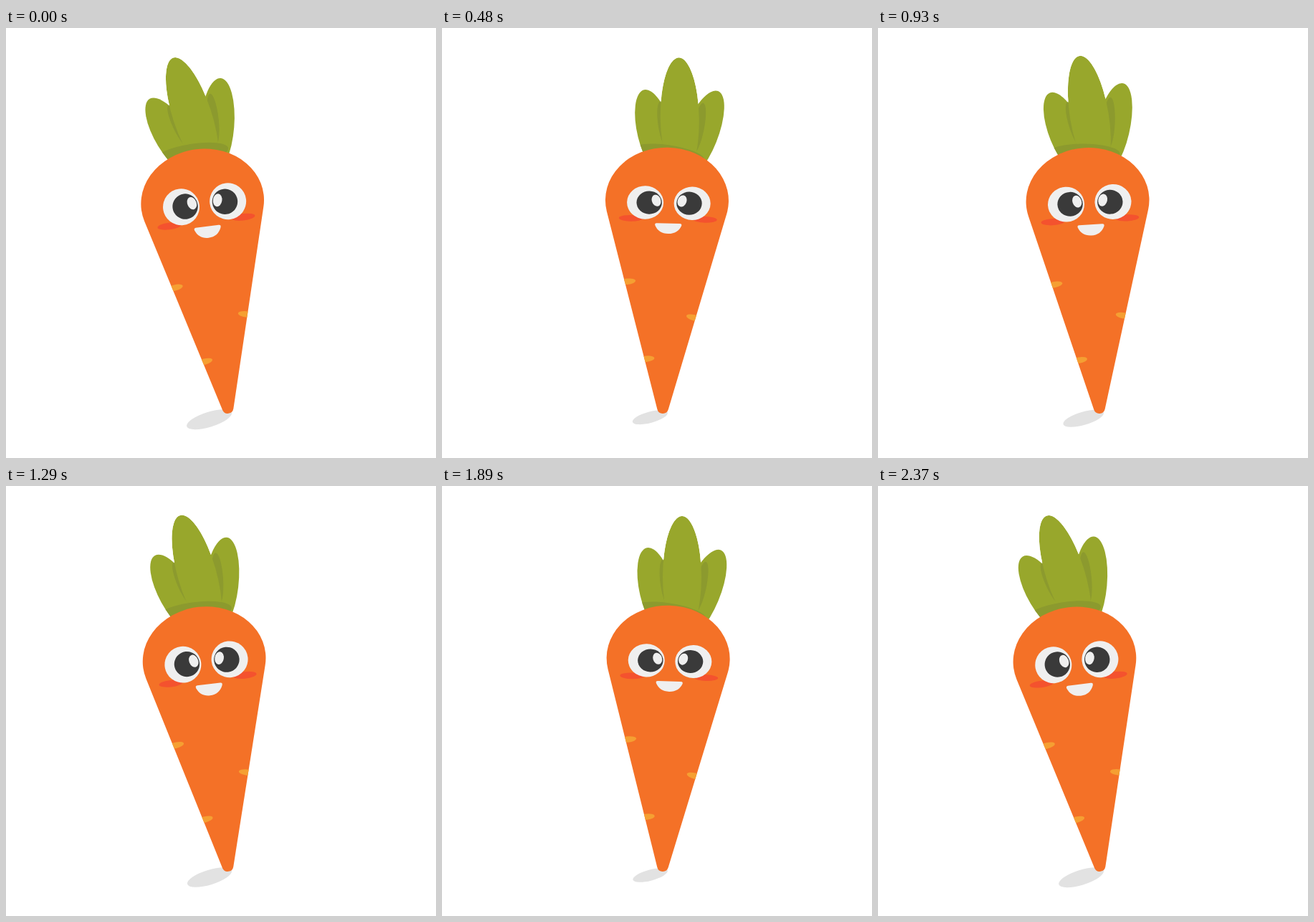
An HTML page for the animation above (2400 ms loop, 600 by 600 pixels).

```html
<!DOCTYPE html>
<html lang="en">
<head>
<meta charset="utf-8">
<title>Swaying carrot</title>
<style>
  html, body { margin: 0; height: 100%; overflow: hidden; background: #fff; }
  svg { display: block; width: 100%; height: 100%; }
</style>
</head>
<body>
<svg viewBox="0 0 600 600">
  <defs>
    <clipPath id="bodyClip">
      <path id="bodyShape" d="M-7.7 11.6L-83.7-262.9A86 74 0 1 1 83.7-262.9L7.7 11.6A8 8 0 0 1-7.7 11.6Z"/>
    </clipPath>
    <clipPath id="leafClip">
      <ellipse id="leftLeaf" rx="24" ry="62" transform="translate(-18.3 -373.6) rotate(-14.5)"/>
      <ellipse id="rightLeaf" rx="24" ry="67" transform="translate(45.3 -370.4) rotate(21.2)"/>
      <ellipse id="midLeaf" rx="27" ry="85" transform="translate(16.4 -394.1) rotate(-1.5)"/>
    </clipPath>
  </defs>

  <ellipse id="shadow" cx="-32.5" rx="32.8" ry="10.5" fill="#e2e2e2"/>

  <g id="carrot">
    <g id="leaves" fill="#98a72c">
      <use href="#leftLeaf"/>
      <use href="#rightLeaf"/>
      <g clip-path="url(#leafClip)">
        <g fill="#8c9a2e">
          <ellipse rx="8.5" ry="34" transform="translate(-5.1 -384.5) rotate(-9.5)"/>
          <ellipse rx="8" ry="36" transform="translate(42.5 -380.7) rotate(10.5)"/>
        </g>
        <use href="#midLeaf"/>
        <ellipse rx="52" ry="14" fill="#8c9a2e" transform="translate(0 -343.1) rotate(7.5)"/>
      </g>
    </g>

    <use href="#bodyShape" fill="#f47127"/>
    <g clip-path="url(#bodyClip)" fill="#f59f32">
      <ellipse rx="11.5" ry="4.2" transform="translate(-53 -165.7) rotate(-7)"/>
      <ellipse rx="11.5" ry="4.2" transform="translate(41.5 -117) rotate(13)"/>
      <ellipse rx="11.5" ry="4.2" transform="translate(-24.5 -58.3) rotate(-7)"/>
    </g>

    <g id="face" fill="#efefef">
      <g fill="#f4522e">
        <ellipse cx="-52.6" cy="24.5" rx="16.5" ry="4.8"/>
        <ellipse cx="51.3" cy="24.5" rx="16.5" ry="4.8"/>
      </g>
      <circle cx="-32.8" r="25.5"/>
      <circle cx="32.8" r="25.5"/>
      <g fill="#3a3a3a">
        <circle cx="-27.2" r="17.7"/>
        <circle cx="28.6" r="17.7"/>
      </g>
      <ellipse rx="6.3" ry="9" transform="translate(-17.4 -3.3) rotate(-15)"/>
      <ellipse rx="6.3" ry="9" transform="translate(18.6 -3.3) rotate(15)"/>
      <path d="M-16 31.3H16Q19.5 31.3 18.3 35C15 43 9 47.3 0 47.3S-15 43-18.3 35Q-19.5 31.3-16 31.3Z"/>
    </g>
  </g>
</svg>
<script>
  const PERIOD = 1200;
  const setTransform = (id, value) =>
    document.getElementById(id).setAttribute('transform', value);

  function draw(now) {
    const phase = now % PERIOD / PERIOD;
    const linear = 1 - Math.abs(2 * phase - 1);
    const eased = (1 - Math.cos(2 * Math.PI * phase)) / 2;

    setTransform('carrot', `translate(308.3 520.5) rotate(${-7 + 9 * eased})`);
    setTransform('leaves', `rotate(${-9.7 + 11.4 * linear} -33 -303.5)`);
    setTransform('face', `translate(2.5 -276.5) scale(1 ${1 - 0.1 * eased})`);
    setTransform('shadow', `translate(314.6 536.6) rotate(${-17.3 + 2.4 * eased})
      scale(${1 - 0.25 * eased} ${1 - 0.29 * eased})`);
  }

  const start = performance.now();
  function tick() {
    draw(performance.now() - start);
    requestAnimationFrame(tick);
  }
  tick();
</script>
</body>
</html>
```
